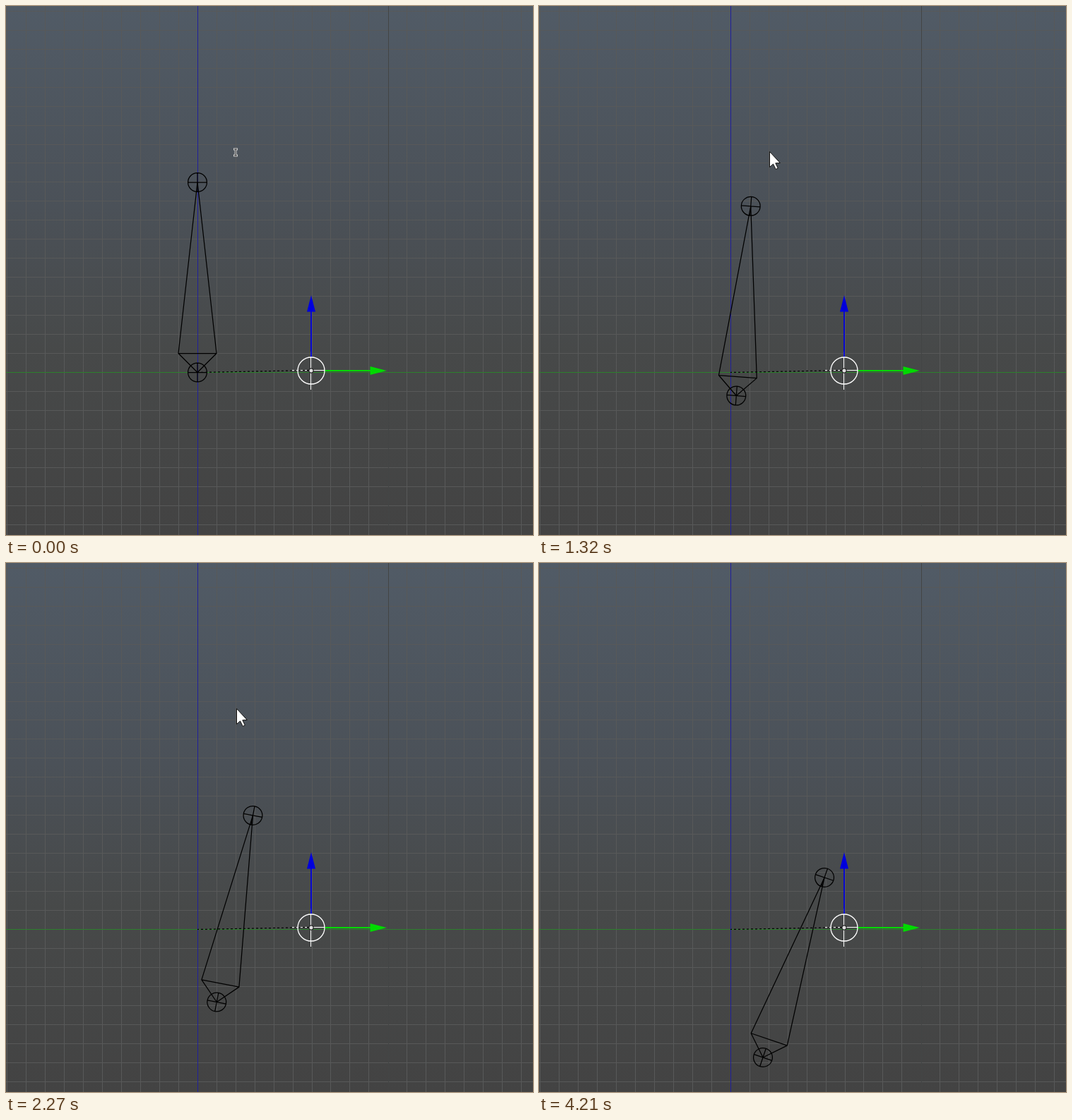
Animation, 746 px wide and 750 px high, one loop 4520 ms. Source, as an HTML page with a canvas:

```html
<!DOCTYPE html>
<html lang="en">
<head>
<meta charset="utf-8">
<title>Bone rotation</title>
<style>
  html, body { margin: 0; width: 100%; height: 100%; overflow: hidden; background: #484b4d; }
  canvas { display: block; }
</style>
</head>
<body>
<canvas id="stage" width="746" height="750"></canvas>
<script>
const W = 746, H = 750, LOOP = 4520;
const CELL = 26.95, ORIGIN = { x: 270.8, y: 518.9 };
const BONE_LENGTH = 269.5, BASE = 27, JOINT = 13.4;
const PIVOT = { x: 432, y: 517 }, RING = 19;

// The bone moves in equal hops rather than continuously.
const FIRST_HOP = 451, HOP = 107.6, HOPS = 24;

const KEYS = [
  { hop: 1.6, x: 271, y: 519.5, lean: 0 },
  { hop: 9, x: 279.3, y: 552.5, lean: 4.35 },
  { hop: 14, x: 291, y: 595, lean: 8.32 },
  { hop: 21, x: 308.3, y: 662, lean: 14.8 },
  { hop: HOPS, x: 317, y: 701, lean: 18.85 }
];

const ctx = document.getElementById('stage').getContext('2d');
const clamp = (v, min, max) => Math.max(min, Math.min(max, v));

function line(c, x1, y1, x2, y2, color, width = 1) {
  c.strokeStyle = color;
  c.lineWidth = width;
  c.beginPath();
  c.moveTo(x1, y1);
  c.lineTo(x2, y2);
  c.stroke();
}

function polygon(points) {
  ctx.beginPath();
  points.forEach(([x, y]) => ctx.lineTo(x, y));
  ctx.closePath();
}

function circle(x, y, r) {
  ctx.beginPath();
  ctx.arc(x, y, r, 0, Math.PI * 2);
}

function slope(i, prop) {
  if (i === 0) return 0;
  const a = KEYS[i - 1], b = KEYS[Math.min(i + 1, KEYS.length - 1)];
  return (b[prop] - a[prop]) / (b.hop - a.hop);
}

// Cubic Hermite through the key poses.
function valueAt(hop, prop) {
  const next = KEYS.findIndex(key => key.hop >= hop);
  const i = Math.max(next, 1) - 1;
  const a = KEYS[i], b = KEYS[i + 1], span = b.hop - a.hop;
  const u = clamp((hop - a.hop) / span, 0, 1), v = 1 - u;
  return a[prop] * (1 + 2 * u) * v * v + slope(i, prop) * span * u * v * v +
    b[prop] * (1 + 2 * v) * u * u - slope(i + 1, prop) * span * v * u * u;
}

function makeBackground() {
  const layer = document.createElement('canvas');
  layer.width = W;
  layer.height = H;
  const c = layer.getContext('2d');
  const shade = c.createLinearGradient(0, 0, 0, H);
  shade.addColorStop(0, '#515b66');
  shade.addColorStop(0.38, '#4b5158');
  shade.addColorStop(0.65, '#474949');
  shade.addColorStop(1, '#434343');
  c.fillStyle = shade;
  c.fillRect(0, 0, W, H);

  const snap = v => Math.round(v) + 0.5;
  const column = (x, color) => line(c, snap(x), 0, snap(x), H, color);
  const row = (y, color) => line(c, 0, snap(y), W, snap(y), color);
  for (let i = -19; i <= 8; i++) row(ORIGIN.y + i * CELL, '#585959');
  for (let i = -10; i <= 17; i++) {
    if (i !== 10) column(ORIGIN.x + i * CELL, '#585959');
  }
  column(541, '#434545');
  row(ORIGIN.y, '#2c802c');
  column(ORIGIN.x, '#20209a');
  return layer;
}

function drawJoint(y) {
  circle(0, y, JOINT);
  ctx.moveTo(-JOINT, y);
  ctx.lineTo(JOINT, y);
  ctx.moveTo(0, y - JOINT);
  ctx.lineTo(0, y + JOINT);
  ctx.stroke();
}

function drawBone(hop) {
  ctx.save();
  ctx.translate(valueAt(hop, 'x'), valueAt(hop, 'y'));
  ctx.rotate(valueAt(hop, 'lean') * Math.PI / 180);
  ctx.strokeStyle = '#000';
  ctx.lineWidth = 1.25;
  ctx.lineJoin = 'bevel';
  polygon([[0, 0], [-BASE, -BASE], [0, -BONE_LENGTH], [BASE, -BASE]]);
  ctx.moveTo(-BASE, -BASE);
  ctx.lineTo(BASE, -BASE);
  ctx.stroke();
  drawJoint(0);
  drawJoint(-BONE_LENGTH);
  ctx.restore();
}

function drawAxis(angle, color) {
  ctx.save();
  ctx.translate(PIVOT.x, PIVOT.y);
  ctx.rotate(angle);
  line(ctx, RING, 0, 84, 0, color, 1.8);
  ctx.fillStyle = color;
  polygon([[107, 0], [83.5, -6], [83.5, 6]]);
  ctx.fill();
  ctx.restore();
}

function drawGizmo() {
  const { x, y } = PIVOT;
  line(ctx, x - BASE, y - 0.5, x + BASE, y - 0.5, '#fff');
  line(ctx, x - 0.5, y - BASE, x - 0.5, y + BASE, '#fff');
  ctx.setLineDash([3, 3]);
  ctx.lineDashOffset = 3;
  line(ctx, x, y - 0.5, 271, 519.5, '#000', 1.2);
  ctx.setLineDash([]);
  drawAxis(-Math.PI / 2, '#0000dc');
  drawAxis(0, '#00da00');
  ctx.strokeStyle = '#fff';
  ctx.lineWidth = 1.3;
  circle(x, y, RING);
  ctx.stroke();
  circle(x, y, 3.2);
  ctx.fillStyle = '#dedede';
  ctx.fill();
  ctx.strokeStyle = '#000';
  ctx.lineWidth = 1;
  ctx.stroke();
}

function drawArrow(x, y) {
  ctx.save();
  ctx.translate(x, y);
  polygon([[0.5, 0.5], [0.5, 22.5], [5.5, 18], [9.2, 25.5], [12.3, 24], [8.8, 16.8], [15.3, 16.5]]);
  ctx.fillStyle = '#fff';
  ctx.fill();
  ctx.strokeStyle = '#111';
  ctx.lineWidth = 1;
  ctx.stroke();
  ctx.restore();
}

function drawTextCursor(x, y) {
  for (const [color, width] of [['#d0d0d0', 3], ['#333', 1]]) {
    line(ctx, x, y - 4.5, x, y + 4.5, color, width);
    for (const end of [y - 4.5, y + 4.5]) {
      line(ctx, x - 1.5 - width / 2, end, x + 1.5 + width / 2, end, color, width);
    }
  }
}

const background = makeBackground();

function draw(t) {
  ctx.drawImage(background, 0, 0);
  drawGizmo();
  drawBone(clamp(Math.floor((t - FIRST_HOP) / HOP) + 1, 0, HOPS));
  if (t < 440) drawTextCursor(325, 207.5);
  else if (t < 4110) drawArrow(326, 206);
  else if (t < 4210) drawArrow(261, 252);
}

const start = performance.now();
function tick() {
  draw((performance.now() - start) % LOOP);
  requestAnimationFrame(tick);
}
tick();
</script>
</body>
</html>
```
